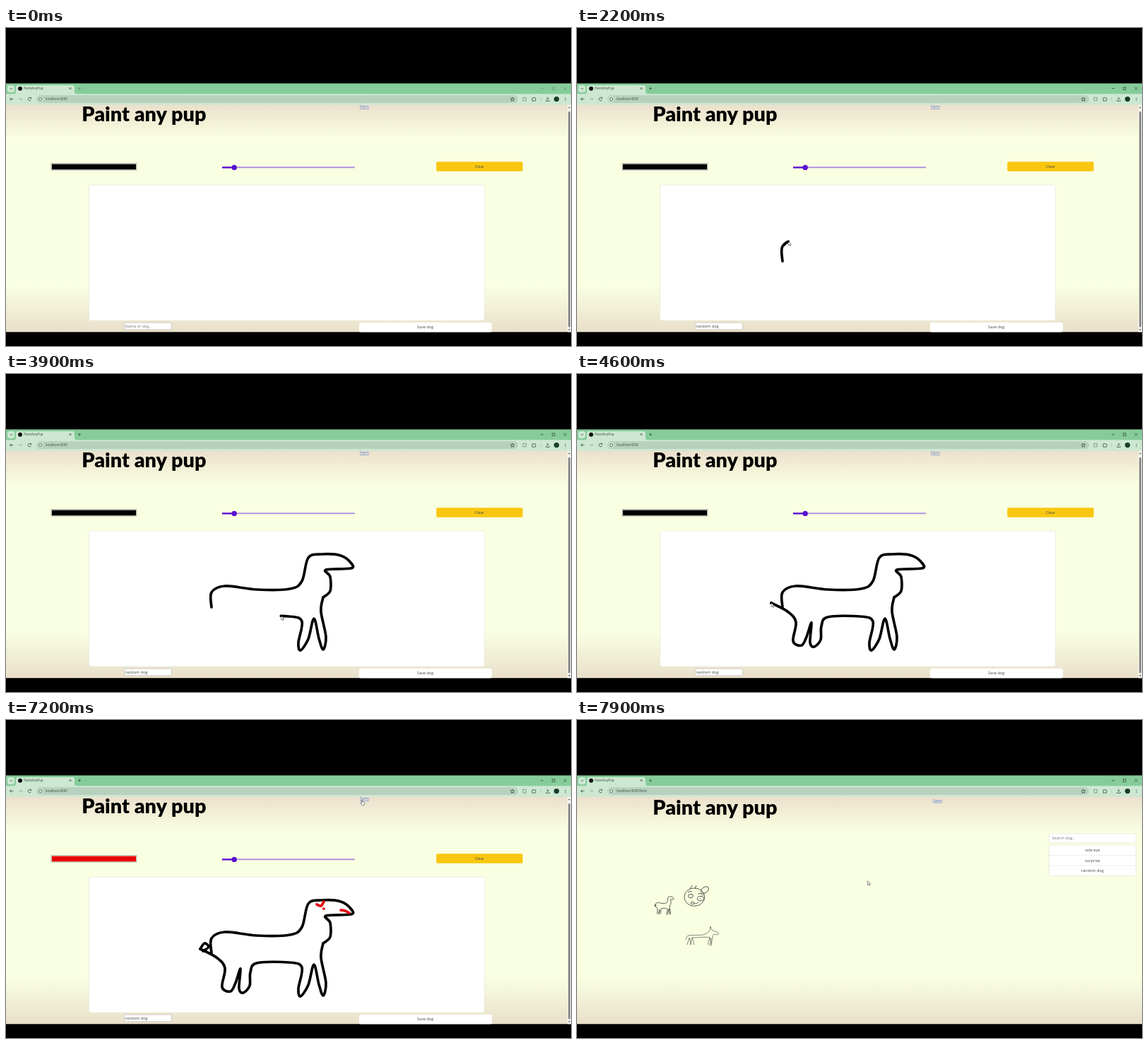
Recreate the animation shown at these times as an HTML page. Size 800 px wide and 450 px high, loop 8000 ms.

```html
<!DOCTYPE html>
<html lang="en">
<head>
<meta charset="utf-8">
<title>Paint any pup</title>
<style>
  html, body { margin: 0; width: 100%; height: 100%; overflow: hidden; background: #000; }
  svg { display: block; width: 100vw; height: 100vh; }
  text { font: 5.6px "Open Sans", "Noto Sans", sans-serif; fill: #444; }
  .mid { text-anchor: middle; }
  .hint { fill: #777; }
  .small { font-size: 4.6px; fill: #354a3b; }
  .title { font: 900 28.8px Lato, sans-serif; fill: #000; }
  .link { fill: #4a70dc; text-decoration: underline; font-size: 5.4px; }
  .line { fill: none; stroke-width: 3.7; stroke-linecap: round; stroke-linejoin: round; }
  .icon { fill: none; stroke: #35503e; stroke-width: .8; }
  .thin { fill: none; stroke: #333; stroke-width: .8; stroke-linejoin: round; }
  .thin path { vector-effect: non-scaling-stroke; }
  .box { fill: #fff; stroke: #e4e7da; stroke-width: .7; }
</style>
</head>
<body>
<svg viewBox="0 0 800 450">
  <defs>
    <linearGradient id="bg" x2="0" y2="1">
      <stop offset="0" stop-color="#ebe0cc"/>
      <stop offset=".15" stop-color="#f9ffe1"/>
      <stop offset=".8" stop-color="#f9ffe1"/>
      <stop offset="1" stop-color="#e9dfca"/>
    </linearGradient>
    <clipPath id="view"><path d="M0 108.5H800V430.4H0z"/></clipPath>
  </defs>
  <rect width="800" height="450"/>

  <!-- browser window -->
  <rect y="78.4" width="800" height="31" fill="#86cc9a"/>
  <path d="M0 93.3H11q3 0 3-3V84q0-3 3-3H94q3 0 3 3v6.3q0 3 3 3H800V109H0z" fill="#cde8d2"/>
  <rect x="2" y="81" width="10" height="10" rx="3" fill="#cde8d2"/>
  <path class="icon" d="M5.5 85l1.7 1.7L9 85M89.5 84l3 3m0-3l-3 3"/>
  <circle cx="20" cy="85.8" r="3" fill="#111"/>
  <text class="small" x="25.3" y="87.4">PaintAnyPup</text>
  <path id="controls" class="icon" d="M102 85.6h4m-2-2v4M757 85.6h4M773.4 83.8h3.6v3.6h-3.6zM789.6 83.6l4 4m0-4l-4 4"/>
  <rect x="43" y="95.3" width="682" height="10.8" rx="5.4" fill="#b8d0be"/>
  <path class="icon" d="M10.5 100.6h-5m2.2-2.2l-2.2 2.2 2.2 2.2M35 99a2.3 2.3 0 1 0 .5 2.5M35.6 97.8v1.8h-1.8"/>
  <path class="icon" opacity=".35" d="M17.5 100.6h5m-2.2-2.2l2.2 2.2-2.2 2.2"/>
  <circle cx="48.5" cy="100.7" r="3.8" fill="#d5ebd8"/>
  <circle class="icon" cx="48.5" cy="100.7" r="2.2"/>
  <text class="small" id="url" x="56" y="102.3"></text>
  <path class="icon" d="M717 98l.8 1.8 2 .2-1.5 1.3.5 2-1.8-1-1.8 1 .5-2-1.5-1.3 2-.2z"/>
  <path class="icon" opacity=".6" d="M732 98.4h4.4v4.6H732z"/>
  <path class="icon" d="M745 99h1.6q.6-2 1.4 0h1.6v1.4q2 .7 0 1.4v1.4H745zM767 97.8v3.4m-1.6-1.6l1.6 1.6 1.6-1.6M764.6 102v1.4h4.8V102"/>
  <path d="M757 98v5.4" stroke="#9fbda7" stroke-width=".7"/>
  <circle cx="779.5" cy="100.6" r="3.7" fill="#173d2b"/>
  <path d="M792 98.6v4.6" stroke="#35503e" stroke-dasharray="1 .8"/>

  <g clip-path="url(#view)">
    <rect y="108.5" width="800" height="322" fill="url(#bg)"/>
    <text id="head" class="title" x="107.3"></text>

    <!-- drawing page -->
    <g id="draw">
      <text class="link" x="501" y="113.4">Farm</text>
      <rect x="64" y="191.7" width="121" height="9.4" fill="#d8d8d0" stroke="#a3a39c" stroke-width=".7"/>
      <rect id="swatch" x="65" y="192.7" width="119" height="7.5"/>
      <path d="M306 197.4H494" stroke="#b79be6" stroke-width="1.6"/>
      <path d="M306 197H494" stroke="#7b4ad0" stroke-width=".8" stroke-dasharray="1 1"/>
      <path d="M306 197.4H323" stroke="#5a0fd2" stroke-width="2.4"/>
      <circle cx="323.2" cy="197.4" r="3.7" fill="#5a0fd2"/>
      <rect x="609.3" y="189.3" width="122.4" height="13.4" rx="2" fill="#f9c711"/>
      <text class="mid" x="670.4" y="198">Clear</text>
      <rect class="box" x="117.5" y="222" width="560" height="192" rx="3"/>
      <rect id="field" class="box" x="167.5" y="417" width="67" height="9.8" rx=".8"/>
      <text id="name" x="168.6" y="424"></text>
      <rect x="500" y="416.7" width="188" height="14" rx="3" fill="#fff"/>
      <text class="mid" x="593.7" y="425.3">Save dog</text>
      <g id="strokes"></g>
      <rect x="795" y="108.5" width="5" height="322" fill="#f4f5ee"/>
      <path d="M797.5 119.5V422" stroke="#858585" stroke-width="2.8" stroke-linecap="round"/>
      <path d="M795.9 113.3l1.6-2.2 1.6 2.2zM795.9 426l1.6 2.2 1.6-2.2z" fill="#666"/>
    </g>

    <!-- farm page -->
    <g id="farm">
      <text class="link" x="504" y="115.7">Farm</text>
      <rect class="box" x="668.5" y="160.8" width="123" height="12.8" rx="2"/>
      <text class="hint" x="672.5" y="169.2">Search dog..</text>
      <rect class="box" x="668.5" y="177" width="123" height="43.5" rx="2"/>
      <path class="box" d="M668.5 191.5h123M668.5 206h123"/>
      <g id="list"></g>
      <g class="thin">
        <g id="mini" transform="translate(74.7 202) scale(.127 .188)"></g>
        <ellipse cx="166.3" cy="250.6" rx="14.4" ry="12.8"/>
        <ellipse cx="181" cy="240.5" rx="6" ry="4" transform="rotate(-35 181 240.5)"/>
        <ellipse cx="161" cy="249" rx="3.4" ry="2.8"/>
        <ellipse cx="175" cy="252.6" rx="4.6" ry="3.2"/>
        <ellipse cx="163.5" cy="259" rx="2.4" ry="1.6"/>
        <path d="M160 239l3-5M167 239l2-5M157 244q3-3 6-1M171 246q4-2 8 2M166 260q4 1 6-3M161 249h1M174 253h1"/>
        <g id="wolf" opacity=".75"></g>
      </g>
    </g>
  </g>

  <path id="arrow" d="M0 0V5.6L1.4 4.4 2.4 6.5 3.3 6.1 2.4 4H4.2z" fill="#fff" stroke="#333" stroke-width=".55"/>
  <path id="hand" d="M-.6 .5q.7-1 1.3 0V3l2.7.7q.6.3.4 1.2L3 7.8H.2L-2 5q-.2-1 .6-.8l.8.7z" fill="#fff" stroke="#333" stroke-width=".55"/>
</svg>
<script>
const LOOP = 8000, FARM = 7300, BLACK = '#000', RED = '#e3000f';
const SVG = 'http://www.w3.org/2000/svg';
const $ = id => document.getElementById(id);
const clamp = v => Math.max(0, Math.min(1, v));
const show = (node, on) => node.style.display = on ? '' : 'none';
const parse = text => text.split(' ').map(p => p.split(',').map(Number));

function add(parent, tag, attrs) {
  const node = document.createElementNS(SVG, tag);
  for (const key in attrs) node.setAttribute(key, attrs[key]);
  return parent.appendChild(node);
}

// Smooth curve through a few key points (Catmull-Rom)
function curve(pts) {
  const at = i => pts[Math.max(0, Math.min(pts.length - 1, i))];
  const ctrl = (i, dir) => at(i).map((v, k) => v + dir * (at(i + 1)[k] - at(i - 1)[k]) / 6);
  return 'M' + at(0) + pts.slice(1).map((p, i) => `C${ctrl(i, 1)} ${ctrl(i + 1, -1)} ${p}`).join('');
}

// What the pointer does: start, end, key points, ink (none = rest there)
const moves = [
  [300, 300, '236,432'],
  [550, 700, '204,421'],
  [1000, 1850, '213,378'],
  [2100, 3200, '291,330 291,309 310,300 355,305 402,304 419,293 428,260 447,255 474,257 489,268 488,275 453,277 459,287 459,307 449,316', BLACK],
  [3200, 4600, '449,316 446,336 453,372 449,390 443,374 436,346 428,375 417,391 414,380 419,350 400,343 355,344 346,357 345,376 336,386 330,380 332,352 325,372 318,384 306,378 310,351 298,336 275,324', BLACK],
  [4600, 4850, '275,324 281,316 287,321 279,327', BLACK],
  [5150, 5300, '125,196'],
  [5640, 5680, '449.8,267 450,267', RED],
  [5900, 6150, '440,261 446,263 450,257', RED],
  [6350, 6550, '474,269 480,270 486,273', RED],
  [6800, 6920, '594,422'],
  [7180, FARM, '504,113'],
  [7650, LOOP, '411.4,227.8']
].map(([from, to, text, ink]) => {
  const pts = parse(text), move = { from, to, pts };
  if (ink) {
    const d = curve(pts);
    move.path = add($('strokes'), 'path', { d, class: 'line', stroke: ink });
    move.length = move.path.getTotalLength();
    if (ink === BLACK) add($('mini'), 'path', { d });
  }
  return move;
});
const strokes = moves.filter(m => m.path);

add($('wolf'), 'path', { d: curve(parse('154,311 158,305 178,304 187,299 189,292 191,297 200,301 199,304 193,304 190,318 188,318 188,308 163,308')) });
for (const x of [156, 160, 185]) add($('wolf'), 'path', { d: `M${x} 318l3-10 3 10` });
['side eye', 'surprise', 'random dog'].forEach((label, i) =>
  add($('list'), 'text', { class: 'mid', x: 729.8, y: 186.3 + 14.5 * i }).textContent = label);
$('head').textContent = 'Paint any pup';

const progress = (m, t) => clamp((t - m.from) / (m.to - m.from));

function pointer(t) {
  const i = Math.max(0, moves.findLastIndex(m => m.from <= t));
  const now = moves[i], next = moves[i + 1];
  if (t <= now.to || !next) {
    if (!now.path) return now.pts[0];
    const p = now.path.getPointAtLength(now.length * progress(now, t));
    return [p.x, p.y];
  }
  const p = (t - now.to) / (next.from - now.to), ease = p * p * (3 - 2 * p);
  return now.pts.at(-1).map((v, k) => v + (next.pts[0][k] - v) * ease);
}

function render(t) {
  const farm = t >= FARM, focused = t >= 600 && t < 2100;
  show($('draw'), !farm);
  show($('farm'), farm);
  $('head').setAttribute('y', farm ? 134.3 : 131.8);
  $('url').textContent = 'localhost:4200' + (farm ? '/farm' : '');
  $('controls').style.opacity = t < 600 ? .4 : 1;

  const typed = 'random dog'.slice(0, Math.floor(clamp((t - 1050) / 800) * 10));
  $('name').textContent = typed || 'Name of dog..';
  $('name').style.fill = typed ? '#444' : '#777';
  $('field').style.stroke = focused ? '#555f6b' : '#bcbcb4';
  $('swatch').style.fill = t < 5250 ? BLACK : '#ea0006';

  for (const s of strokes) {
    const p = progress(s, t);
    show(s.path, p > 0);
    s.path.style.strokeDasharray = p < 1 ? `${s.length * p} ${s.length + 9}` : 'none';
  }

  const link = t >= 7150 && t < FARM;
  show($('arrow'), t >= 300 && !link);
  show($('hand'), link);
  for (const id of ['arrow', 'hand']) $(id).setAttribute('transform', `translate(${pointer(t)})`);
}

const start = performance.now();
function frame() {
  render((performance.now() - start) % LOOP);
  requestAnimationFrame(frame);
}
frame();
</script>
</body>
</html>
```
